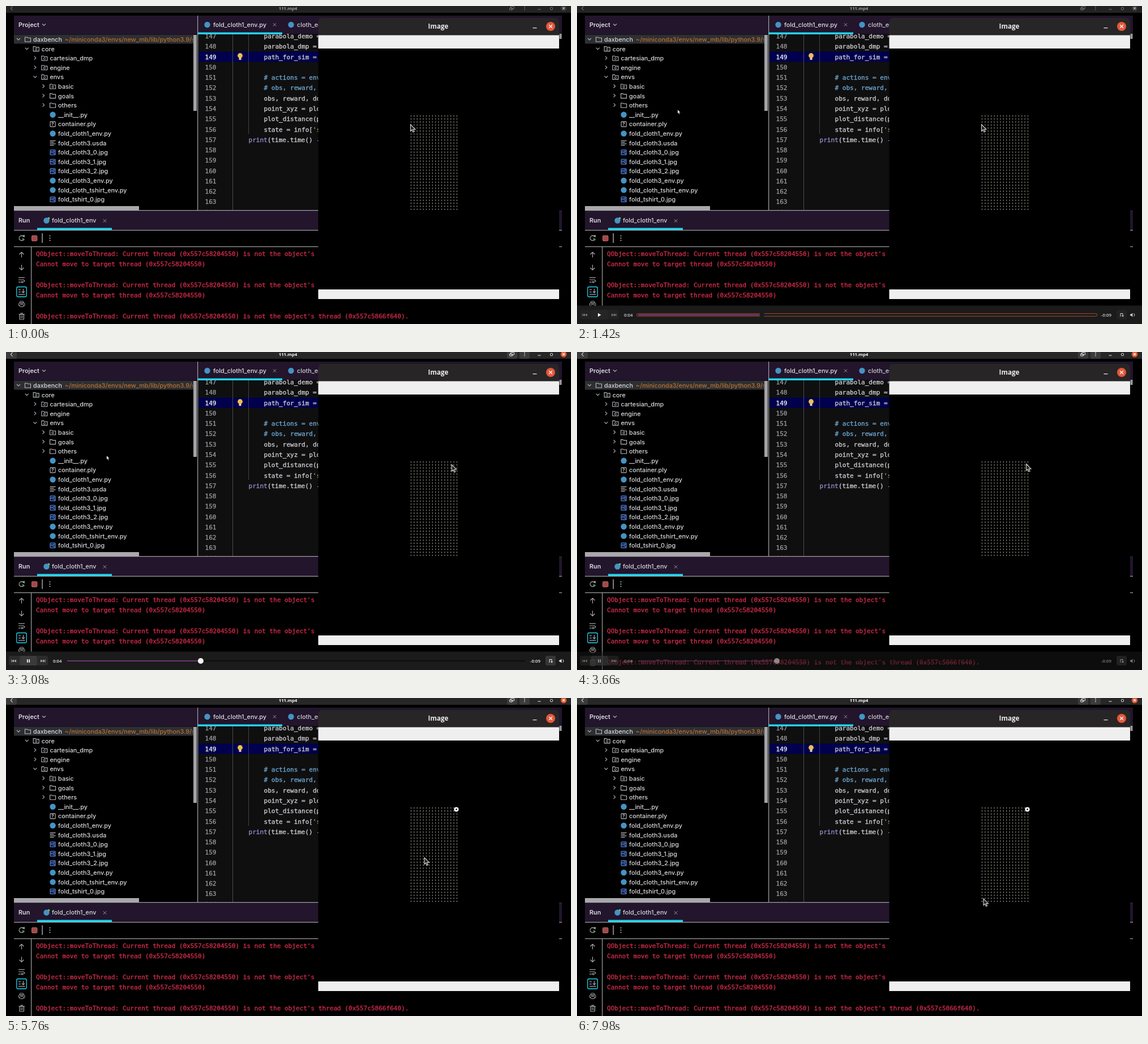
An HTML page with a canvas that plays this animation: 998 by 561 pixels, repeating every 8000 ms.

```html
<!DOCTYPE html>
<html lang="en">
<head>
<meta charset="utf-8">
<title>Cloth demo</title>
<style>
html, body { margin: 0; width: 100%; height: 100%; overflow: hidden; background: #000; }
canvas { display: block; width: 998px; height: 561px; }
</style>
</head>
<body>
<canvas id="stage" width="998" height="561"></canvas>
<script>
(() => {
  const W = 998, H = 561, LOOP = 8000;
  const stage = document.getElementById('stage').getContext('2d');
  let c = stage;

  const UI = '500 10.8px Inter, sans-serif';
  const UI_BOLD = '600 10.8px Inter, sans-serif';
  const MONO = '11.05px "DejaVu Sans Mono", monospace';
  const TITLE = 'bold 11.7px "Open Sans", sans-serif';
  const SMALL = '600 7.8px "Open Sans", sans-serif';
  const PURPLE = '#22152c', EDITOR = '#0f0f10', LINE = '#a2a2a4';
  const CYAN = '#22d3ee', ORANGE = '#e2562f', PYTHON = '#4593c4';
  const CODE_STEP = 18.27, CHAR = 6.652;

  // ---- drawing helpers ----
  function rect(x, y, w, h, color) {
    c.fillStyle = color;
    c.fillRect(x, y, w, h);
  }
  function round(x, y, w, h, r, color) {
    c.fillStyle = color;
    c.beginPath();
    c.roundRect(x, y, w, h, r);
    c.fill();
  }
  function box(x, y, w, h, color, width = 1, r = 1) {
    c.strokeStyle = color;
    c.lineWidth = width;
    c.beginPath();
    c.roundRect(x, y, w, h, r);
    c.stroke();
  }
  function disc(x, y, r, color) {
    c.fillStyle = color;
    c.beginPath();
    c.arc(x, y, r, 0, Math.PI * 2);
    c.fill();
  }
  function trace(points) {
    c.beginPath();
    points.forEach(([x, y], i) => i ? c.lineTo(x, y) : c.moveTo(x, y));
  }
  function line(points, color, width = 1) {
    trace(points);
    c.strokeStyle = color;
    c.lineWidth = width;
    c.stroke();
  }
  function poly(points, color) {
    trace(points);
    c.fillStyle = color;
    c.fill();
  }
  function text(str, x, y, font, color, align = 'left') {
    c.font = font;
    c.fillStyle = color;
    c.textAlign = align;
    c.fillText(str, x, y + 3.9);
  }
  // Monospace text, slightly heavier than regular
  function mono(str, x, y, color) {
    text(str, x, y, MONO, color);
    c.strokeStyle = color;
    c.lineWidth = 0.35;
    c.strokeText(str, x, y + 3.9);
  }
  function clipped(x, y, w, h, draw) {
    c.save();
    c.beginPath();
    c.rect(x, y, w, h);
    c.clip();
    draw();
    c.restore();
  }
  function cross(x, y, r, color, width = 1) {
    line([[x - r, y - r], [x + r, y + r]], color, width);
    line([[x + r, y - r], [x - r, y + r]], color, width);
  }
  function chevron(x, y, open, color = '#b4b4b6') {
    line(open ? [[x - 3, y - 1.5], [x, y + 1.5], [x + 3, y - 1.5]]
              : [[x - 1.5, y - 3], [x + 1.5, y], [x - 1.5, y + 3]], color, 1.1);
  }
  function dots(x, y, gap, r, color) {
    for (let i = -1; i < 2; i++) disc(x, y + i * gap, r, color);
  }

  const icons = {
    folder(x, y) {
      line([[x - 5, y - 4], [x - 1.5, y - 4], [x, y - 2.7], [x + 5, y - 2.7],
            [x + 5, y + 4], [x - 5, y + 4], [x - 5, y - 4.5]], '#b9bac0', 1.1);
    },
    pack(x, y) {
      icons.folder(x, y);
      box(x - 1.5, y - 0.8, 3, 3, '#b9bac0');
    },
    py(x, y) { disc(x, y, 5.2, PYTHON); },
    unknown(x, y) {
      box(x - 4.5, y - 4.5, 9, 9, '#b9bac0', 1.1);
      text('?', x, y - 0.9, 'bold 8px Inter, sans-serif', '#d0d0d4', 'center');
    },
    lines(x, y) {
      [10, 7, 10, 7].forEach((w, i) => rect(x - 5, y - 4.5 + i * 2.7, w, 1.2, '#b9bac0'));
    },
    image(x, y) {
      rect(x - 5, y - 4.5, 10, 9, '#14244c');
      box(x - 4.5, y - 4.5, 9, 9, '#5481d8', 1.1);
      line([[x - 4, y], [x - 1, y - 1], [x + 4, y + 3.5]], '#7ba1ec');
      disc(x + 2, y - 1.8, 1, '#7ba1ec');
    }
  };

  // ---- desktop behind everything ----
  // label, indent level, icon, arrow (1 open, 0 closed)
  const tree = [
    ['daxbench', 0, 'folder', 1], ['core', 1, 'pack', 1],
    ['cartesian_dmp', 2, 'pack', 0], ['engine', 2, 'pack', 0], ['envs', 2, 'pack', 1],
    ['basic', 3, 'pack', 0], ['goals', 3, 'folder', 0], ['others', 3, 'folder', 0],
    ['__init__.py', 3, 'py'], ['container.ply', 3, 'unknown'],
    ['fold_cloth1_env.py', 3, 'py'], ['fold_cloth3.usda', 3, 'lines'],
    ['fold_cloth3_0.jpg', 3, 'image'], ['fold_cloth3_1.jpg', 3, 'image'],
    ['fold_cloth3_2.jpg', 3, 'image'], ['fold_cloth3_env.py', 3, 'py'],
    ['fold_cloth_tshirt_env.py', 3, 'py'], ['fold_tshirt_0.jpg', 3, 'image']
  ];

  function drawTree() {
    rect(14, 17, 324, 33, PURPLE);
    text('Project', 22, 33, UI_BOLD, '#dcdce0');
    chevron(67, 33, true);
    rect(14, 50.5, 317, 16, '#2e2f33');
    tree.forEach(([label, level, icon, arrow], i) => {
      const y = 59 + i * 16.6, x = 48 + level * 14.7;
      if (arrow !== undefined) chevron(x - 26, y - 0.5, arrow);
      icons[icon](x - 9.5, y);
      text(label, x, y, UI, '#dadadd');
    });
    clipped(100, 50, 230, 18, () =>
      text('~/miniconda3/envs/new_mb/lib/python3.9/site', 104, 59, UI, '#b9702f'));
    rect(331, 51, 6, 134, '#a2a2a5');
    rect(14, 353, 221, 7, '#a9a9ab');
  }

  const code = [
    [147, 'parabola_demo ='], [148, 'parabola_dmp ='], [149, 'path_for_sim ='],
    [151, '# actions = env'], [152, '# obs, reward, '], [153, 'obs, reward, do'],
    [154, 'point_xyz = plot'], [155, 'plot_distance(po'], [156, 'state = info[']
  ];

  function drawEditor() {
    const rowY = n => 53.2 + (n - 147) * CODE_STEP;
    rect(339, 17, 643, 32, PURPLE);
    rect(339, 49, 643, 312, EDITOR);
    rect(340, 80.5, 212, 18, '#00004e');
    rect(400, 49, 1, 311, '#4c4c4e');
    for (let y = 50; y < 226; y += 2) rect(428, y, 1, 1, '#77777a');
    clipped(339, 49, 213, 311, () => {
      for (let n = 147; n <= 164; n++) mono(n, 351.5, rowY(n), n === 149 ? '#f0f0f0' : '#98989b');
      code.forEach(([n, str]) => mono(str, 455.5, rowY(n), str[0] === '#' ? '#6fa5cc' : '#cbcbce'));
      mono("'st", 455.5 + 13 * CHAR, rowY(156), '#7fae62');
      mono('print', 428.5, rowY(157), '#8f8bc4');
      mono('(time.time() -', 428.5 + 5 * CHAR, rowY(157), '#cbcbce');
    });
    disc(413.5, 87.5, 4.4, '#f0bd4c');
    rect(411.5, 91, 4, 4, '#d9d0b8');
    icons.py(355.5, 33);
    text('fold_cloth1_env.py', 366, 33, UI, '#e0e0e3');
    cross(474.5, 33, 2.6, '#98989c');
    icons.py(503.5, 33);
    text('cloth_env.py', 514, 33, UI, '#d0d0d4');
    rect(339, 46.5, 149, 3.5, CYAN);
    rect(338, 17, 1.2, 343, LINE);
  }

  function drawConsole() {
    rect(14, 361, 968, 34, PURPLE);
    text('Run', 22, 378.5, UI_BOLD, '#dcdce0');
    icons.py(71.5, 378.5);
    disc(75.5, 374.5, 1.9, '#5fb865');
    text('fold_cloth1_env', 81, 378.5, UI, '#d8d8dc');
    cross(174.5, 379, 2.8, '#98989c');
    [360, 395, 424].forEach(y => rect(14, y, 968, 1.2, LINE));
    rect(55, 391.5, 132, 3.5, CYAN);
    rect(44, 424, 1.2, 137, LINE);

    c.strokeStyle = '#b4b4b8';
    c.lineWidth = 1.2;
    c.beginPath();
    c.arc(27.5, 409.5, 4.3, 0.9, 5.4);
    c.stroke();
    poly([[28.5, 405], [33, 404], [32.5, 408.5]], '#b4b4b8');
    poly([[29, 409], [33.5, 412], [29, 415]], '#5d8f63');
    round(45.5, 405, 9.5, 9.5, 1.5, '#a04a4a');
    box(45.5, 405, 9.5, 9.5, '#c06060', 1, 1.5);
    rect(63.5, 401, 1.2, 17, '#d0d0d0');
    dots(77.5, 409.5, 4, 1, '#c8c8cc');

    const ink = '#a9a9ad';
    [[439, -1], [461, 1]].forEach(([y, d]) => {
      line([[27.5, y - 4.5], [27.5, y + 4.5]], ink, 1.2);
      line([[23.5, y + d * 0.8], [27.5, y + d * 4.6], [31.5, y + d * 0.8]], ink, 1.2);
    });
    rect(22, 478.5, 11, 1.2, ink);
    line([[22, 483], [31, 483], [33, 485], [31, 487], [28, 487]], ink, 1.2);
    rect(22, 486.5, 4, 1.2, ink);
    poly([[29, 484.5], [26.5, 487], [29, 489.5]], ink);
    box(18.8, 495.5, 17.5, 17.5, CYAN, 1.3, 2.5);
    rect(22, 508, 11.5, 1.2, ink);
    rect(22, 500, 4, 1.2, ink);
    rect(22, 504, 4, 1.2, ink);
    line([[30.5, 499], [30.5, 506]], ink, 1.2);
    line([[28, 503.5], [30.5, 506], [33, 503.5]], ink, 1.2);
    box(24.5, 521, 6.5, 3, ink);
    box(22.5, 524, 10.5, 5, ink);
    rect(24.5, 526.5, 6.5, 5, '#000');
    box(24.5, 526.5, 6.5, 4, ink);
    rect(22.5, 543.5, 10.5, 1.2, ink);
    rect(25.5, 541.5, 4.5, 1.2, ink);
    box(24, 544, 7.5, 9, ink, 1.2);
    rect(26.2, 546, 1, 5, ink);
    rect(28.5, 546, 1, 5, ink);

    const lead = "QObject::moveToThread: Current thread (0x557c58204550) is not the object's";
    const logs = [lead, 'Cannot move to target thread (0x557c58204550)', '',
      lead, 'Cannot move to target thread (0x557c58204550)', '',
      lead + ' thread (0x557c5866f640).'];
    logs.forEach((str, i) => mono(str, 53, 437.3 + i * CODE_STEP, '#d02c49'));
  }

  function drawImageWindow() {
    round(551.5, 21, 425.5, 40, [7, 7, 0, 0], '#282526');
    rect(551.5, 51.5, 425.5, 483.5, '#000');
    rect(551.5, 51.5, 425.5, 23.5, '#efefef');
    rect(551.5, 500, 425.5, 17, '#efefef');
    rect(977, 49, 5, 312, '#000');
    rect(977.5, 49, 4, 9, '#9a9a9c');
    text('Image', 763.5, 36.3, TITLE, '#ececec', 'center');
    rect(930.5, 38, 7, 1.3, '#e0e0e0');
    disc(962, 36, 8, '#e4583a');
    cross(962, 36, 2.8, '#fff', 1.3);
    for (let row = 0; row < 32; row++)
      for (let col = 0; col < 16; col++)
        rect(714.8 + col * 5.4, 193.3 + row * 5.31, 1.4, 1.4, '#c4c4b4');
  }

  function makeDesktop() {
    const layer = document.createElement('canvas');
    layer.width = W;
    layer.height = H;
    c = layer.getContext('2d');
    rect(0, 0, W, H, '#000');
    drawTree();
    drawEditor();
    drawConsole();
    drawImageWindow();
    c = stage;
    return layer;
  }

  // ---- player window ----
  function drawHeader(active) {
    const ink = active ? '#ececec' : '#7c7c7c';
    rect(0, 0, W, 12, active ? '#272727' : '#232323');
    if (active) [[0, 19], [885, 18], [907, 18]].forEach(([x, w]) => round(x, -3, w, 15, 3, '#3b3b3b'));
    line([[11.5, 0.5], [8.5, 4], [11.5, 7.5]], ink, 1.1);
    text('111.mp4', 498, 3, 'bold 7.8px "Open Sans", sans-serif', active ? '#fff' : '#a0a0a0', 'center');
    box(891.5, 0.5, 6, 4.5, ink);
    box(889.5, 3, 5, 4, ink);
    dots(916, 4, 2.6, 0.8, ink);
    rect(939.5, 5.5, 5, 1, ink);
    box(961.5, 2.5, 4, 4, ink);
    disc(985, 4, 5.3, active ? ORANGE : '#363636');
    cross(985, 4, 2, active ? '#fff' : '#b5b5b5', 1.1);
  }

  function skip(x, y, d, color) {
    poly([[x, y - 2.5], [x + d * 4, y], [x, y + 2.5]], color);
    poly([[x - d * 4, y - 2.5], [x, y], [x - d * 4, y + 2.5]], color);
    rect(x + d * 4 - 0.5, y - 2.5, 1, 5, color);
  }

  function drawControls(alpha, active, knob) {
    const y = 545, ink = active ? '#f2f2f2' : '#d5d5d5', dim = active ? '#a8a8a8' : '#777';
    c.globalAlpha = alpha;
    rect(0, 528.5, W, 33, '#1b1b1b');
    round(5, 536, 69, 17, 3, active ? '#2b2b2b' : '#222');
    round(24.5, 536, 30, 17, 2, active ? '#3a3a3a' : '#252525');
    skip(14, y, -1, dim);
    skip(65, y, 1, dim);
    if (active) {
      rect(37, y - 2.8, 1.8, 5.6, ink);
      rect(40.3, y - 2.8, 1.8, 5.6, ink);
    } else {
      poly([[37, y - 3.3], [42.5, y], [37, y + 3.3]], '#fff');
    }
    text('0:04', 83, y - 1, SMALL, ink);
    text('-0:09', 944, y - 1, SMALL, ink, 'right');
    if (active) {
      rect(108, y - 1, 809, 1.8, '#0c0c0c');
      rect(108, y - 0.8, knob - 108, 1.5, '#8a4593');
      disc(knob, y, 5, '#f4f4f4');
    } else {
      rect(108, y - 1, 219, 2, '#7a3d82');
      box(105.5, y - 2.3, 813.5, 4.6, '#a84a2c', 1, 2.3);
      disc(knob, y, 4.5, '#1b1b1b');
    }
    round(953, 536, 18, 17, 3, active ? '#363636' : '#222');
    line([[960, y + 3], [960, y - 2.5], [964, y - 2.5], [964, y + 2]], ink);
    poly([[962, y + 1], [966, y + 1], [964, y + 3.5]], ink);
    poly([[977, y - 1.3], [978.8, y - 1.3], [981.3, y - 3.5], [981.3, y + 3.5],
          [978.8, y + 1.3], [977, y + 1.3]], ink);
    c.strokeStyle = ink;
    c.lineWidth = 1;
    c.beginPath();
    c.arc(981.5, y, 3.3, -0.9, 0.9);
    c.stroke();
    c.globalAlpha = 1;
  }

  function pointer(x, y, size, fill, edge, width) {
    const shape = [[0, 0], [0, 13], [3, 10.3], [5, 15], [7.3, 14], [5.3, 9.5], [9.3, 9.5]]
      .map(([px, py]) => [x + px * size, y + py * size]);
    poly(shape, fill);
    shape.push(shape[0], shape[1]);
    line(shape, edge, width);
  }

  // ---- motion ----
  const path = [
    [0, 714.5, 209], [2080, 714.5, 209], [2260, 734, 211], [2750, 776, 201],
    [3250, 793, 197.5], [3660, 793.5, 197.5], [4360, 794.5, 196.5], [4980, 794.5, 196.5],
    [5350, 770, 237], [5760, 739, 281.5], [6250, 725, 330], [6900, 718, 354], [8000, 718, 354]
  ];
  function along(t) {
    const i = path.findIndex(p => p[0] > t);
    const [t0, x0, y0] = path[i - 1], [t1, x1, y1] = path[i];
    const k = (t - t0) / (t1 - t0);
    return [x0 + (x1 - x0) * k, y0 + (y1 - y0) * k];
  }
  const ramp = (t, a, b) => Math.min(1, Math.max(0, (t - a) / (b - a)));

  const desktop = makeDesktop();

  function render(t) {
    const active = t >= 1950;
    c.drawImage(desktop, 0, 0);
    if (t >= 4700) {
      disc(795.5, 196.5, 4, '#fff');
      disc(795.5, 196.5, 1.4, '#222');
    }
    const [x, y] = along(t);
    pointer(x, y, 0.9, '#222', '#c9c9c9', 1.2);
    drawHeader(active);
    const alpha = ramp(t, 1000, 1250) * (1 - ramp(t, 3500, 3820));
    if (alpha > 0) drawControls(alpha, active, 327 + 26 * ramp(t, 2300, 3500));
    if (t >= 1000 && t < 3500) pointer(177.5, 182.5, 0.58, '#fff', '#000', 0.6);
  }

  const start = performance.now();
  function tick() {
    render((performance.now() - start) % LOOP);
    requestAnimationFrame(tick);
  }
  tick();
})();
</script>
</body>
</html>
```
